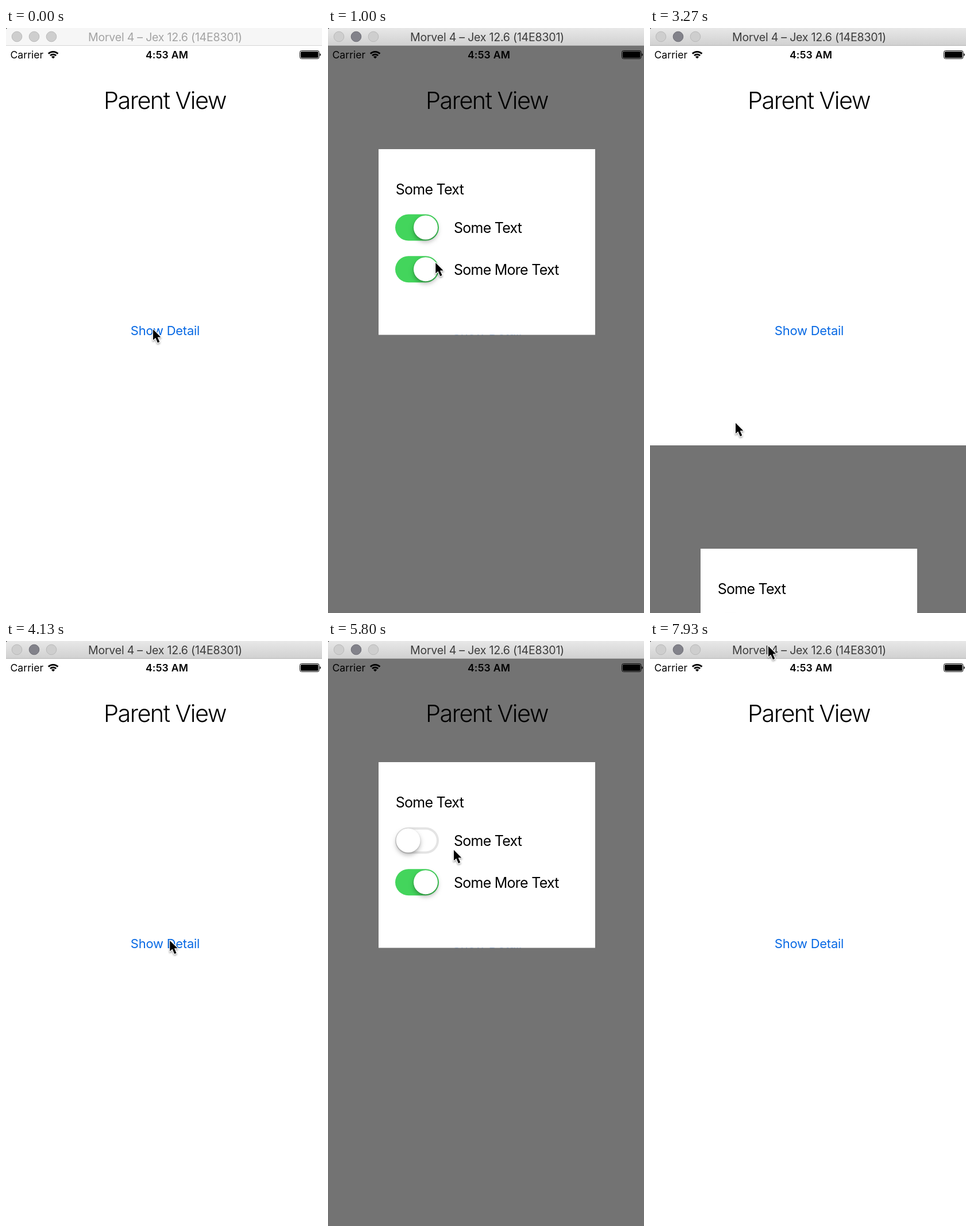
Animation of 550 by 1019 pixels, one loop 8000 ms. Source, as an HTML page:

```html
<!DOCTYPE html>
<html lang="en">
<head>
<meta charset="utf-8">
<title>Modal demo</title>
<style>
  html, body { margin: 0; width: 100%; height: 100%; overflow: hidden; background: #fff; }
  svg { display: block; width: 100vw; height: 100vh; }
  text { font-family: Inter, "Liberation Sans", sans-serif; white-space: pre; }
  .small { font-size: 17.6px; }
  .label { font-size: 25px; letter-spacing: -0.75px; }
  .knob { fill: #fff; filter: drop-shadow(0 4px 4px rgba(0,0,0,.25)) drop-shadow(0 1px 1px rgba(0,0,0,.18)); }
  #cursor { filter: drop-shadow(0 2px 1.5px rgba(0,0,0,.35)); }
</style>
</head>
<body>
<svg viewBox="0 0 550 1019" preserveAspectRatio="none">
  <defs>
    <linearGradient id="active" x2="0" y2="1">
      <stop stop-color="#e8e8e8"/><stop offset="1" stop-color="#d0d0d0"/>
    </linearGradient>
  </defs>
  <rect width="550" height="1019" fill="#fff"/>

  <text class="small" x="7.5" y="53">Carrier</text>
  <g fill="none" stroke="#000" stroke-width="2.8">
    <path d="M73.8 44.7a11.8 11.8 0 0 1 16.6 0M77 48.1a7.2 7.2 0 0 1 10.2 0"/>
  </g>
  <path d="M82.1 53.3l-3.1-3.1a4.4 4.4 0 0 1 6.2 0z"/>
  <text class="small" x="280" y="53" text-anchor="middle" font-weight="600" letter-spacing=".2">4:53 AM</text>
  <rect x="511.5" y="39.5" width="33.5" height="14" rx="3" fill="none" stroke="#000"/>
  <rect x="513" y="41" width="30.5" height="11" rx="1.6"/>
  <path d="M546.2 44.1q1.7.6 1.7 2.4t-1.7 2.4z"/>

  <text x="276.5" y="141" text-anchor="middle" font-size="41.5" font-weight="300" letter-spacing="-1.6">Parent View</text>
  <text id="button" x="277" y="535" text-anchor="middle" font-size="22" letter-spacing="-.25" fill="#0769e4">Show Detail</text>

  <g id="modal">
    <rect y="31" width="550" height="988" fill="#000" fill-opacity=".55"/>
    <rect x="88" y="211" width="377" height="323.5" fill="#fff"/>
    <text class="label" x="117.8" y="290">Some Text</text>
    <text class="label" x="219" y="357">Some Text</text>
    <text class="label" x="219" y="430">Some More Text</text>
    <g class="switch" transform="translate(117 324.5)"></g>
    <g class="switch" transform="translate(117 397.2)"></g>
  </g>

  <rect id="bar" width="550" height="31"/>
  <rect id="rule" y="30" width="550" height="1"/>
  <path d="M0 0h2L0 2z" fill="#333"/>
  <g id="lights" stroke-width="1">
    <circle cx="19" cy="15" r="8.8"/><circle cx="49" cy="15" r="8.8"/><circle cx="79" cy="15" r="8.8"/>
  </g>
  <text id="title" x="277" y="22.5" text-anchor="middle" font-size="19.6" letter-spacing="-.25">Morvel 4 – Jex 12.6 (14E8301)</text>

  <path id="cursor" d="M0 0V18.6L4.3 14.7L7.9 23.2L11.3 21.8L7.7 13.4H13.4Z"
    stroke="#fff" stroke-width="2.4" paint-order="stroke" stroke-linejoin="round"/>
</svg>
<script>
const LOOP = 8000, FPS = 15, TRAVEL = 988, OMEGA = 18.26;
const $ = id => document.getElementById(id);
const clamp = v => Math.min(1, Math.max(0, v));
const ease = v => v * v * (3 - 2 * v);
const mix = (a, b, v) => a + (b - a) * v;

// Each showing of the modal: slide times and when each switch is released.
const shows = [
  { open: 467, close: 3132, toggles: [1600, 2385] },
  { open: 4406, close: 6735, toggles: [5480, Infinity] }
];
const presses = [400, 4330];

// Pointer tip: time, x, y
const path = [
  [0, 256, 525], [700, 256, 525], [1200, 150, 346], [1750, 150, 346],
  [2070, 163, 425], [2450, 163, 425], [2800, 149, 688], [3330, 149, 688],
  [3870, 279, 521], [4200, 286, 522], [4650, 286, 522], [5200, 150, 346],
  [5530, 150, 346], [5800, 219, 364], [5930, 305, 412], [6070, 382, 345],
  [6200, 336, 224], [6267, 335, 221], [6530, 314, 101], [6800, 314, 101], [7200, 327, 121],
  [7400, 327, 121], [7930, 206, 9], [LOOP, 206, 9]
];

const svgEl = (name, attrs) => {
  const el = document.createElementNS('http://www.w3.org/2000/svg', name);
  set(el, attrs);
  return el;
};
function set(el, attrs) {
  for (const k in attrs) el.setAttribute(k, attrs[k]);
}

const switches = [...document.querySelectorAll('.switch')].map(g => {
  const track = svgEl('rect', { width: 76, height: 46, rx: 23 });
  const hole = svgEl('rect', { fill: '#fff' });
  const knob = svgEl('rect', { class: 'knob', y: 2, height: 42, rx: 21 });
  g.append(track, hole, knob);
  return { track, hole, knob };
});

// Critically damped spring: share of the way still to go.
const remaining = ms => {
  const x = OMEGA * Math.max(0, ms) / 1000;
  const rest = (1 + x) * Math.exp(-x);
  return rest < 0.001 ? 0 : rest;
};

function drawSwitch({ track, hole, knob }, ms) {
  const press = clamp((ms + 150) / 150);
  const go = ease(clamp(ms / 250));
  const width = 42 + 7 * press * (1 - go);
  set(knob, { x: mix(74 - width, 1.6, go), width });
  const tint = clamp(ms / 220);
  const rgb = [[67, 213, 92], [228, 228, 228]];
  track.setAttribute('fill', `rgb(${rgb[0].map((c, i) => Math.round(mix(c, rgb[1][i], tint)))})`);
  const grow = 1 - Math.exp(-Math.max(0, ms) / 130);
  const edge = mix(23, 2.3, grow);
  set(hole, { x: edge, y: edge, width: 76 - 2 * edge, height: 46 - 2 * edge, rx: 23 - edge });
}

function pointer(t) {
  const i = path.findIndex(p => p[0] > t);
  const [a, b] = [path[i - 1], path[i]];
  const linear = t >= 5800 && t < 6200;
  const raw = (t - a[0]) / (b[0] - a[0]);
  const v = linear ? raw : ease(raw);
  return [mix(a[1], b[1], v), mix(a[2], b[2], v)];
}

function draw(t) {
  const active = t >= 399;
  set($('bar'), { fill: active ? 'url(#active)' : '#f6f6f6' });
  set($('rule'), { fill: active ? '#b4b4b4' : '#d6d6d6' });
  set($('title'), { fill: active ? '#3c3c3c' : '#a3a3a3' });
  [...$('lights').children].forEach((c, i) => {
    const dark = active && i === 1;
    set(c, { fill: dark ? '#82828a' : '#cecece', stroke: dark ? '#6d6d75' : '#b9b9b9' });
  });

  const show = shows[t < 4400 ? 0 : 1];
  const left = t < show.close ? remaining(t - show.open) : 1 - remaining(t - show.close);
  set($('modal'), { transform: `translate(0 ${Math.round(left * TRAVEL)})` });
  switches.forEach((s, i) => drawSwitch(s, t - show.toggles[i]));

  const since = Math.min(...presses.map(p => t >= p - 1 ? t - p : Infinity));
  set($('button'), { 'fill-opacity': mix(0.2, 1, clamp((since - 67) / 400)) });

  set($('cursor'), { transform: `translate(${pointer(t)})` });
}

const start = performance.now();
function tick(now) {
  const t = Math.max(0, now - start) % LOOP;
  draw(Math.floor(t * FPS / 1000 + 0.1) * 1000 / FPS % LOOP);
  requestAnimationFrame(tick);
}
draw(0);
requestAnimationFrame(tick);
</script>
</body>
</html>
```
